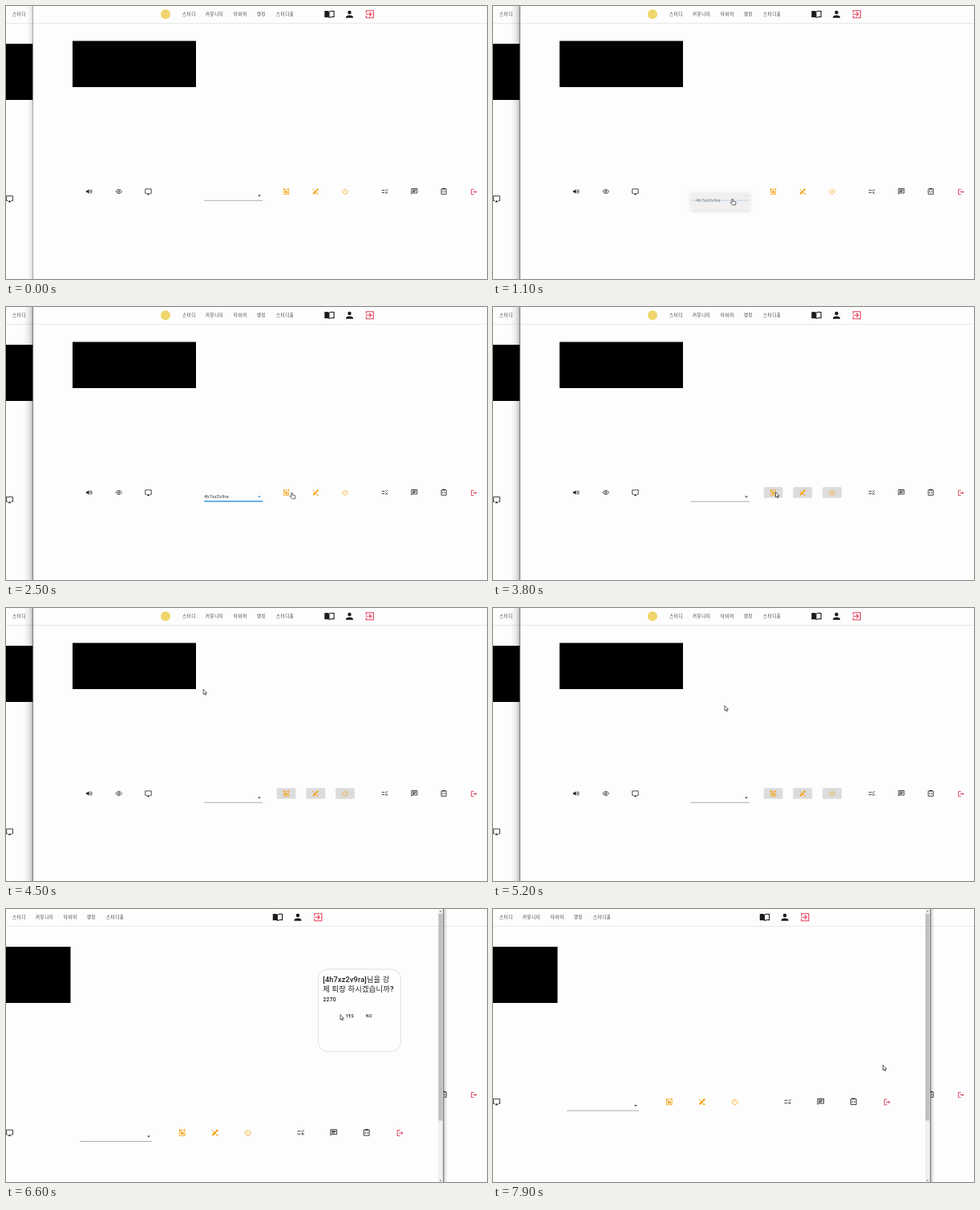
Animation of 600x340 px, one loop 8 s. Source, as an HTML page with a canvas:

```html
<!DOCTYPE html>
<html lang="ko">
<head>
<meta charset="utf-8">
<title>Study room</title>
<style>
html, body { margin: 0; width: 100%; height: 100%; overflow: hidden; background: #fdfdfe; }
canvas { display: block; width: 600px; height: 340px; }
</style>
</head>
<body>
<canvas id="stage"></canvas>
<script>
const W = 600, H = 340, LOOP = 8000, STEP = 100;
const canvas = document.getElementById('stage');
const dpr = window.devicePixelRatio || 1;
canvas.width = W * dpr;
canvas.height = H * dpr;
const ctx = canvas.getContext('2d');

const INK = '#1c1c1c', RED = '#d8203c', ORANGE = '#f5a617', BLUE = '#2f92d6', PAPER = '#fdfdfe';
const FONT = 'Roboto, "Noto Sans CJK KR", "Noto Sans CJK", sans-serif';
const USER = '4h7xz2v9ra';

// Icons on a 24 unit grid
const icons = {
  book: { fill: 'M1 5Q8 3 12 6V20Q8 17.500 1 19Z', line: 'M12 6Q16 4 22 5.500V18Q16 17 12 19.500' },
  person: { fill: 'M12 12a4 4 0 1 0 0-8 4 4 0 0 0 0 8zM12 14c-2.670 0-8 1.340-8 4v2h16v-2c0-2.660-5.330-4-8-4z' },
  leave: { line: 'M4 9V4H20V20H4V15M3 12H15.500M11 7.500L15.500 12 11 16.500' },
  sound: { fill: 'M11 5V19L6.500 15H2V9H6.500Z', line: 'M14 8Q18 12 14 16M16 4.500Q24 12 16 19.500' },
  eye: { line: 'M2 12Q12-1 22 12Q12 25 2 12ZM15 12a3 3 0 1 1-6 0 3 3 0 0 1 6 0Z' },
  screen: { fill: 'M7 22L12 16.500 17 22Z', line: 'M7 18H2.500V4H21.500V18H17' },
  cam: { fill: 'M2 2H7L5 6ZM17 2H22L20 6ZM8 10H16V17H8Z', line: 'M4 5H20V21H4ZM4 5L20 21' },
  mic: { fill: 'M13 7L18 2 22 6 17 11ZM3 21L4 16 12 8 16 12 8 20Z', line: 'M2 4L21 21M14 20H21' },
  power: { line: 'M12 3V13M6.800 6A8 8 0 1 0 17.200 6' },
  rule: { line: 'M2 8H11M2 16H11M13.700 6.700L16.500 9.500 21.500 4.500M14 12.700L20.300 19M20.300 12.700L14 19' },
  chat: { line: 'M3 3H21V17H6L3 20ZM6 7H18M6 10H18M6 13H14' },
  clip: { fill: 'M8 1.500H16V5H8Z', line: 'M4 4H20V20.500H4ZM10 9.500L7.500 12.500 10 15.500M14 9.500L16.500 12.500 14 15.500' },
  exit: { line: 'M12 4H4V20H12M9 12H20M16 8L20 12 16 16' }
};
for (const k in icons) for (const p in icons[k]) icons[k][p] = new Path2D(icons[k][p]);

const arrow = new Path2D('M0 0V6.400L1.500 5.100 2.500 7.300 3.500 6.800 2.500 4.700H4.500Z');
const hand = new Path2D('M1 .5Q2 -.4 2.400 .8V3L5.400 3.700Q6.200 4 6 5L5.400 7.800H2L-.8 5Q-1 3.800 .9 4.800Z');

// Pointer path: time, x, y
const track = [
  [400, 330, 341], [900, 299, 245], [1100, 297, 240], [1900, 297, 240], [2400, 355, 231],
  [2900, 355, 231], [3200, 352.5, 230.500], [3800, 352.5, 230.500], [4200, 270, 95], [4400, 250, 70],
  [4800, 225, 270], [5200, 289, 121.5], [5400, 289, 121.5], [5700, 23, 165], [5900, 23, 165],
  [6400, 405, 138], [6600, 417, 131.500], [6800, 429, 132], [7300, 429, 132], [7800, 486.5, 194.500]
];
const hands = [[900, 2000], [2300, 3000], [6700, 7000]];

const clamp = v => Math.max(0, Math.min(1, v));
const ramp = (t, a, b) => clamp((t - a) / (b - a));
const ease = v => v * v * (3 - 2 * v);
const between = (t, a, b) => t >= a && t < b;

function box(x, y, w, h, color) {
  ctx.fillStyle = color;
  ctx.fillRect(x, y, w, h);
}

function text(str, x, y, size, spacing = 0, weight = 400, color = INK) {
  ctx.font = `${weight} ${size}px ${FONT}`;
  ctx.letterSpacing = spacing + 'px';
  ctx.fillStyle = color;
  ctx.fillText(str, x, y);
}

function icon(name, x, y, size, color = INK) {
  const { fill, line } = icons[name];
  ctx.save();
  ctx.translate(x, y);
  ctx.scale(size / 24, size / 24);
  ctx.translate(-12, -12);
  ctx.fillStyle = ctx.strokeStyle = color;
  ctx.lineWidth = 2;
  if (fill) ctx.fill(fill);
  if (line) ctx.stroke(line);
  ctx.restore();
}

function caret(x, y, color) {
  ctx.fillStyle = color;
  ctx.beginPath();
  ctx.moveTo(x - 2, y - 1);
  ctx.lineTo(x + 2, y - 1);
  ctx.lineTo(x, y + 1);
  ctx.fill();
}

function header(menuX, toolX) {
  box(0, 21, W, 1, '#e8e8ea');
  const menu = [['스터디', 0], ['커뮤니티', 29], ['타이머', 64], ['랭킹', 93], ['스터디홈', 117]];
  for (const [label, dx] of menu) text(label, menuX + dx, 12.3, 5.4, 0.65, 400, '#333');
  icon('book', toolX, 10.3, 13.5);
  icon('person', toolX + 25, 10.3, 13.5);
  icon('leave', toolX + 50.3, 10.3, 13.5, '#e5405c');
}

// Row of room controls; x0 is the screen icon, gap the spacing
function controls(x0, y, gap, size) {
  const at = (name, n, color) => icon(name, x0 + n * gap, y, size, color);
  at('sound', -2);
  at('eye', -1);
  at('screen', 0);
  at('cam', 4.68 + 0.57 * (gap > 40), ORANGE);
  at('mic', 5.68 + 0.57 * (gap > 40), ORANGE);
  at('power', 6.68 + 0.57 * (gap > 40), ORANGE);
  const shift = 8.03 + 0.83 * (gap > 40);
  ['rule', 'chat', 'clip'].forEach((name, i) => at(name, shift + i, INK));
  icon('exit', x0 + (shift + 3) * gap + 0.8, y + 0.5, size, RED);
}

function roundBox(x, y, w, h, r) {
  ctx.beginPath();
  ctx.roundRect(x, y, w, h, r);
}

function dropMenu(open) {
  ctx.save();
  ctx.globalAlpha = open;
  ctx.shadowColor = 'rgba(0,0,0,.22)';
  ctx.shadowBlur = 4 * dpr;
  ctx.shadowOffsetY = 1.5 * dpr;
  ctx.fillStyle = '#fff';
  roundBox(247, 230, 73.5, 24, 1.5);
  ctx.fill();
  ctx.shadowColor = 'transparent';
  box(247, 233, 73.5, 18, '#f1f1f2');
  text(USER, 253, 244, 5.8, 0.1, 400, '#333');
  ctx.restore();
}

function hostPage(t) {
  box(34, 0, W - 34, H, PAPER);
  ctx.save();
  ctx.beginPath();
  ctx.rect(34, 0, W - 34, H);
  ctx.clip();
  header(220, 403.5);
  ctx.fillStyle = '#f0d56c';
  ctx.beginPath();
  ctx.arc(199, 10.3, 6, 0, 7);
  ctx.fill();
  box(83, 43.5, 154, 57.5, '#000');

  const locked = ramp(t, 2800, 3100);
  if (locked) {
    ctx.globalAlpha = locked;
    ctx.fillStyle = '#dcdcdd';
    for (let i = 0; i < 3; i++) {
      roundBox(337.7 + i * 36.7, 224.3, 23.8, 13.4, 1.5);
      ctx.fill();
    }
    ctx.globalAlpha = 1;
  }
  controls(177.5, 231, 36.75, 9.4);

  const focus = between(t, 1000, 3000);
  box(247, focus ? 241.3 : 241.8, 73, focus ? 1.4 : 0.8, focus ? BLUE : '#9a9a9a');
  caret(316, 236.5, focus ? BLUE : '#444');
  if (between(t, 1900, 3000)) text(USER, 247, 238.2, 5.8, 0.1, 400, '#333');
  if (between(t, 1100, 2100)) dropMenu(t < 1900 ? 0.55 + 0.45 * ramp(t, 1100, 1300) : 1 - ramp(t, 1850, 2100));
  ctx.restore();
}

function dialog(t) {
  roundBox(389.5, 75, 103, 102.5, 12);
  ctx.fillStyle = '#fefefe';
  ctx.fill();
  ctx.strokeStyle = '#dcdcde';
  ctx.lineWidth = 0.9;
  ctx.stroke();
  text(`[${USER}]님을 강`, 395.3, 90.6, 9.2, 0.15, 500);
  text('제 퇴장 하시겠습니까?', 395.3, 103.4, 9.3, 0.2, 500);
  text('2270', 395.5, 115, 6.7, 0.3, 500);
  if (between(t, 6700, 7000)) box(420, 128, 18, 11, '#eeeeef');
  text('YES', 424, 135.3, 4.9, 0.5, 500);
  text('NO', 449, 135.3, 4.9, 0.5, 500);
}

function guestPage(t) {
  const asked = between(t, 4000, 7000);
  const y = asked ? 278.5 : 240;
  box(0, 0, 546, H, PAPER);
  ctx.save();
  ctx.beginPath();
  ctx.rect(0, 0, 546, H);
  ctx.clip();
  header(8, 339);
  box(0, 47, 80.5, 70, '#000');
  controls(4.5, y, 41, 10.2);
  box(92, y + 10.7, 90, 0.8, '#9a9a9a');
  caret(178, y + 5, '#444');
  if (asked) dialog(t);

  box(539, 0, 6, H, '#f0f0f1');
  box(539.5, 6, 5, 257.5, '#bfbfc0');
  ctx.fillStyle = '#666';
  ctx.fillRect(541, 2.5, 2, 1);
  ctx.fillRect(541, 337.5, 2, 1);
  ctx.restore();
}

function shade(x, reach, alpha) {
  const g = ctx.createLinearGradient(x, 0, x + reach, 0);
  g.addColorStop(0, `rgba(0,0,0,${alpha})`);
  g.addColorStop(0.4, `rgba(0,0,0,${alpha * 0.3})`);
  g.addColorStop(1, 'rgba(0,0,0,0)');
  box(Math.min(x, x + reach), 0, Math.abs(reach), H, g);
}

function pointer(t) {
  if (t < track[0][0]) return;
  let i = 0;
  while (i < track.length - 2 && t >= track[i + 1][0]) i++;
  const [t0, x0, y0] = track[i], [t1, x1, y1] = track[i + 1];
  const k = ease(ramp(t, t0, t1));
  ctx.save();
  ctx.translate(x0 + (x1 - x0) * k, y0 + (y1 - y0) * k);
  const shape = hands.some(([a, b]) => between(t, a, b)) ? hand : arrow;
  ctx.fillStyle = '#fff';
  ctx.strokeStyle = '#222';
  ctx.lineWidth = 0.7;
  ctx.fill(shape);
  ctx.stroke(shape);
  ctx.restore();
}

function draw(t) {
  ctx.setTransform(dpr, 0, 0, dpr, 0, 0);
  if (t >= 5800) {
    hostPage(t);
    shade(546, 5, 0.3);
    guestPage(t);
    box(545, 0, 0.9, H, '#77777a');
  } else {
    const active = t >= 500;
    guestPage(t);
    shade(34, active ? -12 : -8, active ? 0.3 : 0.2);
    hostPage(t);
    box(33.2, 0, 0.9, H, active ? '#77777a' : '#a5a5a8');
  }
  pointer(t);
}

function tick(now) {
  draw(Math.floor((now % LOOP) / STEP) * STEP);
  requestAnimationFrame(tick);
}
requestAnimationFrame(tick);
</script>
</body>
</html>
```
